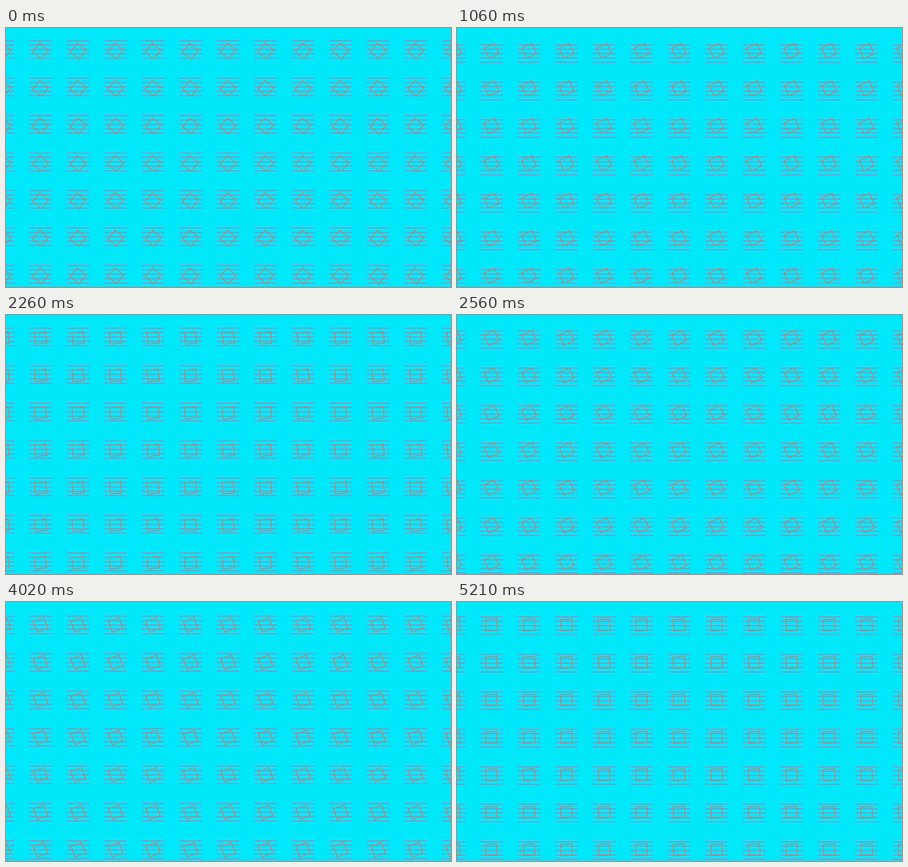
Recreate the animation shown at these times as an HTML page with a canvas. Size 980x571 px, loop 5.31 s.

```html
<!DOCTYPE html>
<html lang="en">
<head>
<meta charset="utf-8">
<title>Turning squares</title>
<style>
  html, body { margin: 0; width: 100%; height: 100%; overflow: hidden; background: #00e8fa; }
  canvas { display: block; }
</style>
</head>
<body>
<canvas id="stage" width="980" height="571"></canvas>
<script>
const ctx = document.getElementById('stage').getContext('2d');
const LOOP = 5310;
const STEPS = [0, 180, 470, 770, 1060, 1360, 1660, 1960, 2260, 2560,
  2830, 3130, 3430, 3720, 4020, 4310, 4610, 4910, 5210];

const CELL = 82.6;
const LINE = { left: 51.5, length: 49.6, gap: 9.7, top: 27.5, count: 5 };
const SQUARE = { x: 76.2, y: 50.7, side: 24.8 };

function drawLines(x, y) {
  for (let i = 0; i < LINE.count; i++) {
    ctx.moveTo(x, y + i * LINE.gap);
    ctx.lineTo(x + LINE.length, y + i * LINE.gap);
  }
}

function drawSquare(x, y, angle) {
  const radius = SQUARE.side / Math.SQRT2;
  for (let i = 0; i < 4; i++) {
    const a = angle + Math.PI / 4 + i * Math.PI / 2;
    ctx[i ? 'lineTo' : 'moveTo'](x + radius * Math.cos(a), y + radius * Math.sin(a));
  }
  ctx.closePath();
}

function strokeCells(color, width, drawCell) {
  ctx.strokeStyle = color;
  ctx.lineWidth = width;
  ctx.beginPath();
  for (let row = 0; row < 7; row++) {
    for (let col = -1; col < 12; col++) drawCell(col * CELL, row * CELL);
  }
  ctx.stroke();
}

function draw(t) {
  const top = LINE.top + (0.45 + t * 0.01772) % LINE.gap;
  const angle = (39.5 - t * 0.06) * Math.PI / 180;

  ctx.fillStyle = '#00e8fa';
  ctx.fillRect(0, 0, 980, 571);
  strokeCells('#ff4a94', 1.2, (x, y) => drawLines(x + LINE.left, y + top));
  strokeCells('#f2683c', 1.3, (x, y) => drawSquare(x + SQUARE.x, y + SQUARE.y, angle));
}

const start = performance.now();
function tick() {
  const t = (performance.now() - start) % LOOP;
  draw(STEPS.findLast(step => step <= t));
  requestAnimationFrame(tick);
}
tick();
</script>
</body>
</html>
```
